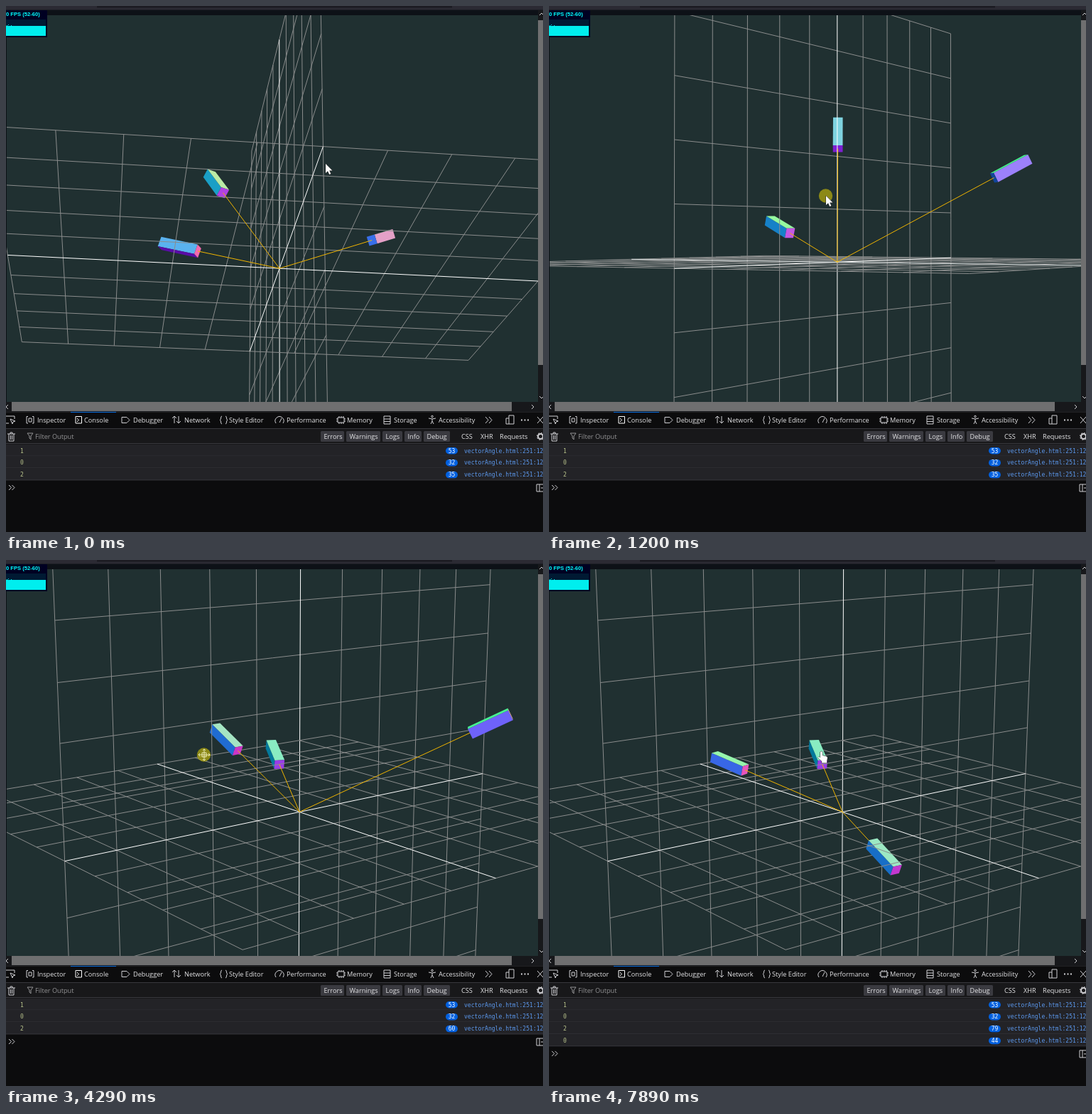
Recreate the animation shown at these times as an HTML page with a canvas. Size 756x740 px, loop 7990 ms.

```html
<!DOCTYPE html>
<html lang="en">
<head>
<meta charset="utf-8">
<title>Vector angle</title>
<style>
  html, body { margin: 0; width: 756px; height: 740px; overflow: hidden; background: #0c0c0d; }
  canvas, svg { position: absolute; left: 0; top: 0; }
  text { font: 9.2px "Open Sans", "Noto Sans", sans-serif; fill: #e4e4e6; }
  .mono { font: 8.05px "DejaVu Sans Mono", monospace; }
  .fps { font: bold 7.6px "Liberation Sans", sans-serif; fill: #0ff; }
  .number { fill: #b9c48c; }
  .link { fill: #5c99ee; }
  .count { font-size: 8px; fill: #fff; text-anchor: middle; }
  .dim { fill: #939395; }
  .icon { fill: none; stroke: #cfcfd3; stroke-width: 1; }
</style>
</head>
<body>
<canvas id="stage" width="756" height="740"></canvas>
<svg id="chrome" width="756" height="740">
  <path fill="#0d1117" d="M0 0H756V13H0zM0 13H1V557H0zM749 13H756V557H749z"/>
  <path fill="#2b2a33" d="M0 0H756V5.500H0z"/>
  <path fill="#1c1b22" d="M128 0H628V2.500H128z"/>
  <path fill="#17181b" d="M749 6H756V570H749zM0 557H756V571H0z"/>
  <path fill="#6f6f70" d="M749 20H756V505H749zM8 557H712V570H8z"/>
  <path class="icon" stroke="#8a8a8a" d="M3 561L0 564L3 567M740 561L743 564L740 567M751 13L754 10L757 13M751 549L754 552L757 549"/>

  <path fill="#000022" d="M0 6H58V44H0z"/>
  <path fill="#001a33" d="M0 19H56V28H0z"/>
  <path fill="#00eeee" d="M0 28H56V42H0z"/>
  <path fill="#00eeee" d="M1 27h1v1h-1zM3 26h1v1h-1zM7 27h1v1h-1z"/>
  <text class="fps" x="-4.2" y="14">60 FPS (52-60)</text>

  <path fill="#0c0c0d" d="M0 571H756V740H0z"/>
  <path fill="#18181a" d="M0 595H756V616H0z"/>
  <path fill="#38383d" d="M0 571H756V571.6H0zM0 594H756V595H0zM0 615H756V616H0z"/>
  <path fill="#0a6fe0" d="M91 571H155V572H91z"/>
  <g class="icon">
    <path d="M0 577H12V581M0 587H4M6 581L13 584L10 585L9 588z"/>
    <path d="M31 577.500H29V587H31M37 577.500H39V587H37M32 580H36V585H32z"/>
    <path stroke="#fff" d="M98 577.500H106.500V587H98zM100 580L102.500 582.500L100 585"/>
    <path d="M163 578.500H170L174 582.500L170 586.500H163z"/>
    <path d="M237 587V577L234 580M237 577L240 580M243 577V587L240 584M243 587L246 584"/>
    <path d="M304 577Q302.500 577 302.500 580Q302.500 582 301 582.500Q302.500 583 302.500 585Q302.500 588 304 588M309 577Q310.500 577 310.500 580Q310.500 582 312 582.500Q310.500 583 310.500 585Q310.500 588 309 588"/>
    <path d="M380 587A6 6 0 1 1 390 587M385 586L388 580"/>
    <path d="M467 579H476V586H467zM469 577V579M472 577V579M475 577V579M469 586V588M472 586V588M475 586V588M465 581H467M465 584H467M476 581H478M476 584H478"/>
    <path d="M532 577H541V588H532zM532 581H541M532 584.500H541"/>
    <path d="M595 580L600 581V584L598 588M605 580L600 581M600 584L602 588"/>
    <circle cx="600" cy="577.500" r="1.300"/>
    <path d="M675 578L679 582.500L675 587M680 578L684 582.500L680 587"/>
    <path d="M708 576H715V588H708zM708 580H704V588H708"/>
    <path stroke-width="2" stroke-dasharray="2 2.500" d="M725 582.500H737"/>
    <path d="M748 578L756 587M756 578L748 587"/>
    <path d="M2 602H13M4 602V612H11V602M6 602V600H9V602M6.500 604V610M8.700 604V610"/>
    <path stroke="#939395" d="M30 601H38L35 605V610L33 608V605z"/>
    <circle cx="752.500" cy="605.500" r="3.500" stroke-width="2"/>
    <circle cx="752.500" cy="605.500" r="5" stroke-dasharray="2 1.900"/>
  </g>
  <g id="labels"></g>
  <g id="rows"></g>
  <g id="prompt">
    <path class="icon" d="M4 674L7.500 677.500L4 681M8.500 674L12 677.500L8.500 681"/>
    <path class="icon" d="M757 673H747V683H757M751 673V683M753 678H757"/>
  </g>
</svg>
<script>
const DURATION = 7990;
const ctx = document.getElementById('stage').getContext('2d');
const byId = id => document.getElementById(id);

// ---- Panel text ----
const label = (x, y, text, cls = '') => `<text x="${x}" y="${y}" class="${cls}">${text}</text>`;
const tabs = [[44, 'Inspector'], [110, 'Console'], [179, 'Debugger'], [251, 'Network'], [314, 'Style Editor'],
  [395, 'Performance'], [480, 'Memory'], [546, 'Storage'], [609, 'Accessibility']];
const filters = [[443, 33, 'Errors'], [479, 48, 'Warnings'], [530, 28, 'Logs'], [561, 24, 'Info'], [588, 37, 'Debug']];
byId('labels').innerHTML = tabs.map(([x, s]) => label(x, 586, s)).join('') +
  label(41, 609, 'Filter Output', 'dim') +
  filters.map(([x, w, s]) => `<rect x="${x}" y="598" width="${w}" height="15" rx="1.5" fill="#3a3a40"/>` + label(x + 4.5, 609, s)).join('') +
  [[641, 'CSS'], [668, 'XHR'], [695, 'Requests']].map(([x, s]) => label(x, 609, s)).join('');

let shownRows = '';
function drawRows(rows) {
  const key = rows.join();
  if (key === shownRows) return;
  shownRows = key;
  byId('rows').innerHTML = rows.map(([value, count], i) => {
    const y = 616.5 + i * 16.9;
    return `<rect y="${y}" width="756" height="16.9" fill="#232327"/><rect y="${y + 16.2}" width="756" height=".8" fill="#3a3a40"/>` +
      label(20, y + 12, value, 'mono number') +
      `<rect x="619" y="${y + 4.5}" width="17" height="9.5" rx="4.7" fill="#0060df"/>` +
      label(627.5, y + 12, count, 'mono count') + label(645, y + 12, 'vectorAngle.html:251:12', 'mono link');
  }).join('');
  byId('prompt').setAttribute('transform', `translate(0 ${(rows.length - 3) * 16.9})`);
}

// ---- Motion: monotone cubic through [time, ...values] keys ----
function track(keys, t) {
  const last = keys.length - 1;
  if (t <= keys[0][0]) return keys[0].slice(1);
  if (t >= keys[last][0]) return keys[last].slice(1);
  const i = keys.findIndex(k => k[0] > t) - 1;
  const dt = keys[i + 1][0] - keys[i][0], s = (t - keys[i][0]) / dt;
  return keys[i].slice(1).map((from, n) => {
    const secant = j => (keys[j + 1][n + 1] - keys[j][n + 1]) / (keys[j + 1][0] - keys[j][0]);
    const slope = j => {
      if (j < 1 || j >= last) return 0;
      const a = secant(j - 1), b = secant(j);
      return a * b > 0 ? 2 * a * b / (a + b) : 0;
    };
    const to = keys[i + 1][n + 1], r = 1 - s;
    return from * r * r * (1 + 2 * s) + to * s * s * (3 - 2 * s) + dt * s * r * (slope(i) * r - slope(i + 1) * s);
  });
}

const orbit = [[0, 97.5, -24.2], [900, 76.8, -10.5], [1200, 58.8, -0.8], [1800, 38.8, 12.6], [2600, 37.75, 13.55]];
const pointer = [[0, 450, 222], [900, 419, 251], [1200, 390, 267], [1800, 368, 284], [2600, 366, 286], [3370, 460, 160],
  [4290, 279, 274], [4890, 240, 290], [5690, 664, 250], [5790, 664, 250], [6790, 455, 437], [7290, 388, 256], [7890, 383, 270]];
const pointerStates = [[0, 'arrow', 0], [300, 'arrow', 1], [1700, 'hand', 1], [2600, 'hand', 0], [2750, 'arrow', 0],
  [3250, 'hand', 0], [3370, 'move', 1], [4890, 'hand', 0], [5050, 'arrow', 0], [5600, 'hand', 0], [5690, 'move', 1],
  [6790, 'hand', 0], [6950, 'arrow', 0], [7200, 'hand', 0]];
// Boxes are dragged across the screen at a fixed depth in the final view.
const boxes = [
  { depth: 25.38, path: [[3370, 468.6, 142.2], [4290, 310, 252], [4890, 254, 286]] },
  { depth: 25.8, path: [[0, 378.7, 273.2]] },
  { depth: 23.15, path: [[5790, 681.7, 230], [6790, 471.3, 417.3]] }
];
const dragCount = [[3370, 35], [4290, 60], [4890, 79]];
const secondCount = [[5790, 0], [6790, 44]];

// ---- Camera: world axes are [x, up, z], one unit per grid cell ----
const FOCAL = 1785, CX = 382, CY = 295, RADIUS = 23.65, OFFSET = [0.4535, -0.8725, 0.1];
const dot = (a, b) => a[0] * b[0] + a[1] * b[1] + a[2] * b[2];
const cross = (a, b) => [a[1] * b[2] - a[2] * b[1], a[2] * b[0] - a[0] * b[2], a[0] * b[1] - a[1] * b[0]];
const add = (a, b, k = 1) => a.map((v, i) => v + b[i] * k);
const scale = (a, k) => a.map(v => v * k);
const unit = a => scale(a, 1 / Math.hypot(...a));

function makeCamera(azimuth, pitch) {
  const a = azimuth * Math.PI / 180, p = pitch * Math.PI / 180;
  const right = [Math.cos(a), 0, Math.sin(a)];
  const forward = [Math.sin(a) * Math.cos(p), -Math.sin(p), -Math.cos(a) * Math.cos(p)];
  const up = [Math.sin(a) * Math.sin(p), Math.cos(p), -Math.cos(a) * Math.sin(p)];
  return {
    position: add(scale(forward, -RADIUS), OFFSET, -1),
    direction: v => [dot(v, right), dot(v, up), -dot(v, forward)],
    project(v) {
      const q = add(v, OFFSET), k = FOCAL / (RADIUS + dot(q, forward));
      return [CX + dot(q, right) * k, CY - dot(q, up) * k];
    },
    unproject(x, y, depth) {
      const k = depth / FOCAL;
      const q = add(add(scale(right, (x - CX) * k), up, (CY - y) * k), forward, depth - RADIUS);
      return add(q, OFFSET, -1);
    }
  };
}
const restCamera = makeCamera(...orbit[orbit.length - 1].slice(1));

function line(camera, from, to, color) {
  ctx.strokeStyle = color;
  ctx.beginPath();
  ctx.moveTo(...camera.project(from));
  ctx.lineTo(...camera.project(to));
  ctx.stroke();
}

// Ten by ten cells spanned by the x axis and a second axis (1 = up, 2 = z).
// The x axis belongs to both grids; only the floor draws it.
function drawGrid(camera, axis) {
  const at = (a, b) => { const v = [a, 0, 0]; v[axis] = b; return v; };
  for (const i of [-5, -4, -3, -2, -1, 1, 2, 3, 4, 5, 0]) {
    const color = i ? '#8a8c8c' : '#fff';
    line(camera, at(i, -5), at(i, 5), color);
    if (i || axis === 2) line(camera, at(-5, i), at(5, i), color);
  }
}

function drawBox(camera, center) {
  const half = [0.1, 0.1, 0.4];
  const z = unit(scale(center, -1)), x = unit(cross([0, 1, 0], z)), y = cross(z, x);
  const axes = [x, y, z];
  const innerEnd = add(center, z, half[2]);
  const facing = (normal, point) => dot(normal, add(camera.position, point, -1)) > 0;
  const drawVector = () => line(camera, [0, 0, 0], innerEnd, '#f0b400');
  const endVisible = facing(z, innerEnd);
  if (!endVisible) drawVector();

  const silhouette = new Path2D();
  axes.forEach((axis, i) => [1, -1].forEach(side => {
    const normal = scale(axis, side), middle = add(center, normal, half[i]);
    if (!facing(normal, middle)) return;
    const j = (i + 1) % 3, k = (i + 2) % 3;
    const face = new Path2D();
    [[1, 1], [-1, 1], [-1, -1], [1, -1]].forEach(([a, b]) => {
      const corner = add(add(middle, axes[j], a * half[j] * side), axes[k], b * half[k]);
      face.lineTo(...camera.project(corner));
    });
    face.closePath();
    silhouette.addPath(face);
    ctx.fillStyle = `rgb(${camera.direction(normal).map(n => Math.round(127.5 * (n + 1)))})`;
    ctx.fill(face);
  }));

  // Grid planes between the camera and the box show over it.
  ctx.save();
  ctx.clip(silhouette);
  for (const [gridAxis, planeNormal] of [[1, 2], [2, 1]])
    if (center[planeNormal] * camera.position[planeNormal] < 0) drawGrid(camera, gridAxis);
  ctx.restore();
  if (endVisible) drawVector();
}

// ---- Pointer ----
const shapes = {
  arrow: new Path2D('M0 0V13L3 10.3L5.2 15L7.4 14L5.2 9.5H9.4z'),
  hand: new Path2D('M-1 0Q0.500 -1.500 2 0V5L8 6.500Q9 7 9 8.500L8 13V15.500H1V13L-4 8.500Q-4 6 -1 8z'),
  move: new Path2D('M-8 0H8M0 -8V8M-6 -2L-8 0L-6 2M6 -2L8 0L6 2M-2 -6L0 -8L2 -6M-2 6L0 8L2 6M-3 -3H3V3H-3z')
};
function drawPointer(t) {
  const [x, y] = track(pointer, t);
  const [, kind, pressed] = pointerStates.filter(s => s[0] <= t).pop();
  ctx.save();
  ctx.translate(x, y);
  if (pressed) {
    ctx.fillStyle = 'rgba(205,190,8,.63)';
    ctx.beginPath();
    ctx.arc(-0.5, 0, 9.7, 0, 7);
    ctx.fill();
  }
  if (kind === 'move') {
    ctx.strokeStyle = 'rgba(255,255,220,.85)';
    ctx.lineWidth = 0.9;
    ctx.stroke(shapes.move);
  } else {
    ctx.strokeStyle = '#222';
    ctx.stroke(shapes[kind]);
    ctx.fillStyle = '#fff';
    ctx.fill(shapes[kind]);
  }
  ctx.restore();
}

function stepTime(t) {
  const shift = t < 1820 ? 0 : t < 4090 ? 20 : 90;
  return Math.floor((t - shift) / 100) * 100 + shift;
}

function render(now) {
  const t = stepTime(now % DURATION);
  const camera = makeCamera(...track(orbit, t));
  ctx.save();
  ctx.beginPath();
  ctx.rect(1, 13, 748, 544);
  ctx.clip();
  ctx.fillStyle = '#203031';
  ctx.fillRect(0, 0, 756, 740);
  ctx.lineWidth = 1;
  drawGrid(camera, 1);
  drawGrid(camera, 2);
  for (const box of boxes) drawBox(camera, restCamera.unproject(...track(box.path, t), box.depth));
  drawPointer(t);
  ctx.restore();

  const rows = [[1, 53], [0, 32], [2, Math.round(track(dragCount, t)[0])]];
  const extra = Math.round(track(secondCount, t)[0]);
  if (extra) rows.push([0, extra]);
  drawRows(rows);
}

const start = performance.now();
function loop() {
  render(performance.now() - start);
  requestAnimationFrame(loop);
}
loop();
</script>
</body>
</html>
```
